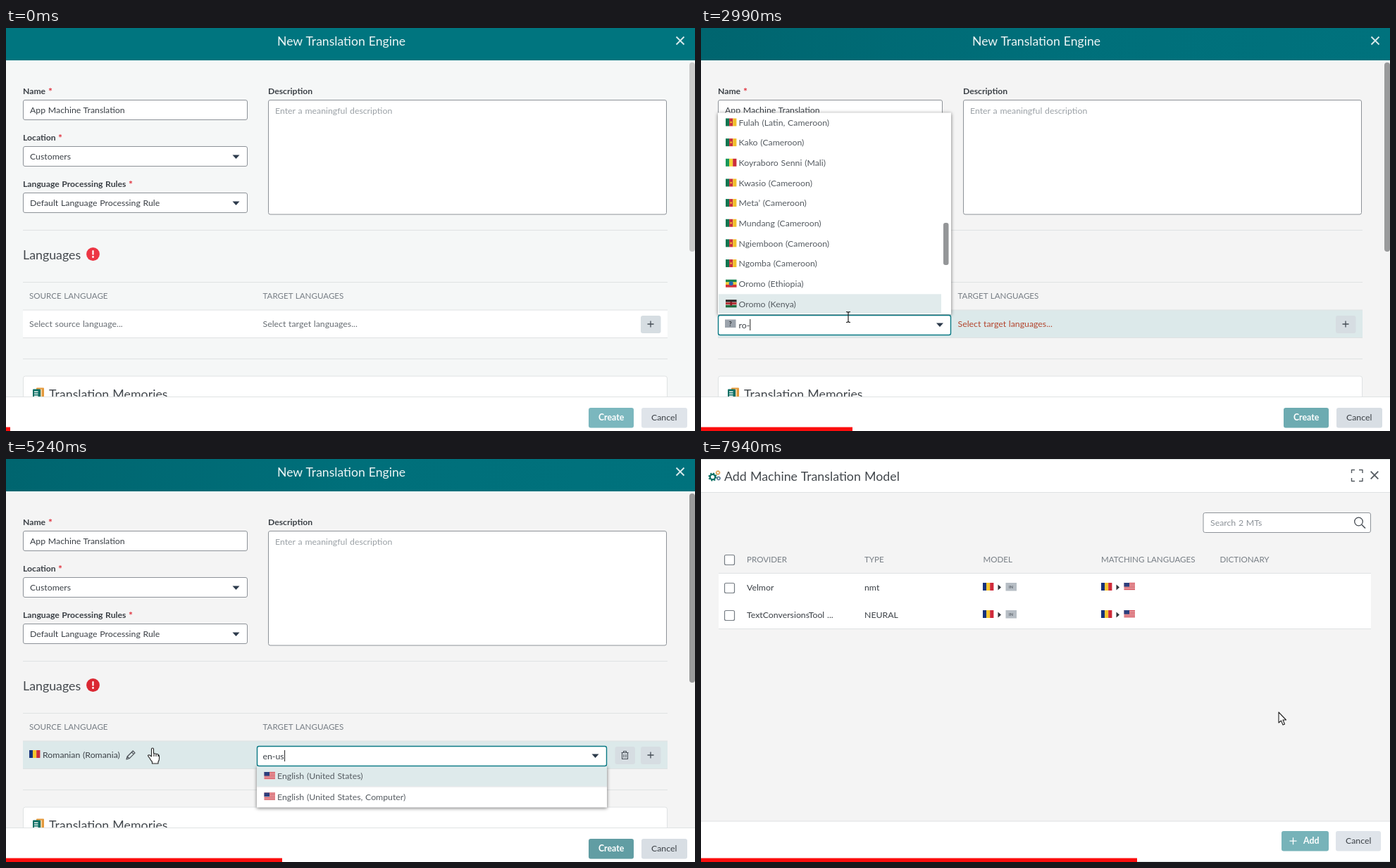
Write an HTML page that moves like this. It is 978x573 px and loops after 8 s.

```html
<!DOCTYPE html>
<html lang="en">
<head>
<meta charset="utf-8">
<title>New Translation Engine</title>
<style>
html, body { margin: 0; width: 100%; height: 100%; overflow: hidden; background: #f4f5f5; }
svg { display: block; width: 100%; height: 100%; font: 12.3px Lato, Carlito, sans-serif; word-spacing: .05em; }
text { white-space: pre; }
.drop { filter: drop-shadow(0 1px 2.5px rgba(0, 0, 0, .55)); }
</style>
</head>
<body>
<svg id="stage" viewBox="0 0 978 573"></svg>
<script>
const LOOP = 8000, SCROLL = 349;
const INK = '#3b4046', TEAL = '#0b7a85', LINE = '#dfe2e3';
const stage = document.getElementById('stage');

// time, progress width, held steps until the next entry
const PACE = [[340, 6, 23], [2010, 138, 14], [2990, 215, 12], [3950, 281, 13],
  [5240, 392, 9], [6360, 486, 14], [7940, 619, 1], [8000, 624, 1]];
const POINTER = [[410, 330, 573], [1170, 209, 411], [5500, 209, 411], [6000, 281, 326],
  [6400, 281, 326], [7060, 820, 360]];
const SOURCE_KEYS = [[2290, 'r'], [2570, 'ro'], [2850, 'ro-'], [3200, 'ro-r'], [3410, 'ro-ro']];
const TARGET_KEYS = [[4300, 'e'], [4490, 'en'], [4690, 'en-'], [4890, 'en-u'], [5090, 'en-us']];
const AT = { hover: 1080, open: 1310, picked: 3820, done: 5370, next: 5750, scroll: 6230, dialog: 7730, rows: 7800 };

const LANGS = [['cm', 'Fulah (Latin, Cameroon)'], ['cm', 'Kako (Cameroon)'], ['ml', 'Koyraboro Senni (Mali)'],
  ['cm', 'Kwasio (Cameroon)'], ['cm', 'Meta’ (Cameroon)'], ['cm', 'Mundang (Cameroon)'],
  ['cm', 'Ngiemboon (Cameroon)'], ['cm', 'Ngomba (Cameroon)'], ['et', 'Oromo (Ethiopia)'], ['ke', 'Oromo (Kenya)']];
const STRIPES = {
  ro: ['v', '#16327c', '#f6c52c', '#cf2b3a'], cm: ['v', '#0d7650', '#c9303a', '#f0c02e'],
  ml: ['v', '#17985a', '#f4d136', '#cc2c3a'], et: ['h', '#17834f', '#f2cd35', '#d2333a'],
  ke: ['h', '#25201f', '#b72f35', '#1c6b3f']
};

const rect = (x, y, w, h, fill, more = '') =>
  `<rect x="${x}" y="${y}" width="${w}" height="${h}" fill="${fill}" ${more}/>`;
const path = (d, stroke, w = 1, fill = 'none') =>
  `<path d="${d}" fill="${fill}" stroke="${stroke}" stroke-width="${w}" stroke-linejoin="round"/>`;
const text = (x, y, s, fill = INK, more = '') => `<text x="${x}" y="${y}" fill="${fill}" ${more}>${s}</text>`;
const bold = (x, y, s) => text(x, y, s, INK, 'font-weight="700" font-size="12.2"');
const head = (x, y, s) => text(x, y, s, '#43484d', 'font-size="17.8"');
const caps = (x, y, s) => text(x, y, s, '#777e85', 'font-size="11.6"');
const rule = (y, x1 = 24, x2 = 939, c = LINE) => rect(x1, y, x2 - x1, 1, c);
const box = (x, y, w, h, stroke = '#8d9298', sw = 1) =>
  rect(x + .5, y + .5, w - 1, h - 1, '#fff', `rx="2.5" stroke="${stroke}" stroke-width="${sw}"`);
const arrow = (x, y) => path(`M${x - 5} ${y - 2.5}h10l-5 5.5z`, 'none', 0, '#2c3a4b');
const plus = (x, y, r = 4.5, c = '#454d56') => path(`M${x - r} ${y}h${2 * r}M${x} ${y - r}v${2 * r}`, c, 1.3);
const cross = (x, y, r, c) => path(`M${x - r} ${y - r}l${2 * r} ${2 * r}M${x + r} ${y - r}l${-2 * r} ${2 * r}`, c, 1.8);
const caret = x => rect(x, 414, 1, 16, '#222');
const move = (x, y, s) => `<g transform="translate(${x} ${y})">${s}</g>`;
const panel = (x, y, w, h) => rect(x, y, w, h, '#fff', 'class="drop"');

function flag(kind, x, y) {
  let s = '';
  if (kind === 'us') {
    for (let i = 0; i < 5; i++) s += rect(0, i * 2.2, 15.5, 1.2, '#cf3440');
    s = rect(0, 0, 15.5, 11, '#f3e4e4') + s + rect(0, 0, 7.5, 5.6, '#2b3f7e');
  } else if (kind === 'none') {
    s = rect(0, 0, 15.5, 11.5, '#9ba3ac') + text(5.4, 9, '?', '#34383d', 'font-size="9" font-weight="700"');
  } else {
    const [dir, ...cols] = STRIPES[kind];
    s = cols.map((c, i) => dir === 'v' ? rect(i * 5.1, 0, 5.2, 11, c) : rect(0, i * 3.6, 15.5, 3.8, c)).join('');
    if (kind === 'cm') s += '<circle cx="7.7" cy="5.5" r="1.3" fill="#f0c02e"/>';
    if (kind === 'et') s += '<circle cx="7.7" cy="5.5" r="3" fill="#2469b3"/>';
    if (kind === 'ke') s += rect(0, 3.2, 15.5, .6, '#eee') + rect(0, 7.1, 15.5, .6, '#eee') +
      '<ellipse cx="7.7" cy="5.5" rx="1.5" ry="3.2" fill="#8d1d25"/>';
  }
  return move(x, y, s);
}

const alert = (x, y, c) => `<circle cx="${x}" cy="${y}" r="9.4" fill="${c}"/>` +
  rect(x - 1.1, y - 5.5, 2.2, 6.8, '#fff', 'rx="1"') + `<circle cx="${x}" cy="${y + 4}" r="1.4" fill="#fff"/>`;

const trash = (x, y) => path(`M${x - 5} ${y - 3.5}h10M${x - 2} ${y - 3.5}v-2h4v2M${x - 4} ${y - 3.5}v9h8v-9M${x - 1.5} ${y - 1}v4.5M${x + 1.5} ${y - 1}v4.5`, '#4b535b', 1.1);
const pencil = (x, y) => path(`M${x - 6} ${y + 6}l1.2-4 8-8 2.8 2.8-8 8zM${x + 1.4} ${y - 4.2}l2.8 2.8M${x - 4.8} ${y + 2}l2.8 2.8`, '#4a4f55', 1.2);
const square = (x, y, icon) => rect(x, y, 28.5, 25, '#d6dde2', 'rx="3"') + icon(x + 14, y + 12);

function gear(x, y, r, c) {
  return `<circle cx="${x}" cy="${y}" r="${r}" fill="none" stroke="${c}" stroke-width="${r * .6}"/>` +
    `<circle cx="${x}" cy="${y}" r="${r * 1.45}" fill="none" stroke="${c}" stroke-width="${r * .4}" stroke-dasharray="${r * .57} ${r * .57}"/>`;
}
const gears = (x, y) => gear(x + 5.5, y + 10.5, 3.7, '#0a6e62') + gear(x + 13, y + 4.5, 2.1, '#e0973c') +
  gear(x + 14, y + 12.5, 1.9, '#35607f');
const memoryIcon = (x, y) => rect(x + 5, y, 11, 13, '#e59a3c', 'rx="1"') + rect(x + 8, y + 2, 5, 12, '#f3cf9d') +
  rect(x, y + 2, 11, 14, '#0b6f64', 'rx="1"') + [5, 8, 11].map(d => rect(x + 2, y + d, 5.5, 1.4, '#fff')).join('');
const termIcon = (x, y) => rect(x, y, 14.5, 17, '#0a6b5a', 'rx="1.5"') + rect(x + 2, y + 2.6, 12.5, 1.3, '#fff') +
  text(x + 2, y + 13.5, 'AZ', '#fff', 'font-size="8.2" font-weight="700"');

function button(x, y, w, label, labelX, opt = {}) {
  const { fill = '#d6dce3', ink = INK, icon = 0, weight = 400 } = opt;
  return rect(x, y, w, 28.5, fill, 'rx="3"') + (icon ? plus(icon, y + 14.2, 5, ink) : '') +
    text(labelX, y + 18.2, label, ink, `font-weight="${weight}"`);
}

function field(y, label, value, select) {
  const mark = { Name: 60, Location: 74 }[label] || 174;
  return bold(24, y - 8.5, label) + text(mark, y - 7, '*', '#e0303c', 'font-weight="700" font-size="14"') +
    box(24, y, 319, 29) + text(34, y + 19, value) + (select ? arrow(326.5, y + 15) : '');
}

function options(x, w, items, thumb) {
  const h = items.length * 28.65, top = 407 - h;
  let s = panel(x, top, w, h);
  items.forEach(([f, name], i) => {
    const y = top + 14 + i * 28.65;
    if (i === items.length - 1) s += rect(x + 1, y - 14, w - 15, 27.5, '#e1ebec');
    s += flag(f, x + 11, y - 6) + text(x + 29.5, y + 4.2, name, '#555b61');
  });
  return s + (thumb ? rect(x + w - 11, thumb, 7.5, 60, '#949698', 'rx="3"') : '');
}

function typed(keys, t) {
  return keys.reduce((s, [at, value]) => t >= at ? value : s, '');
}

function textWidth(s) {
  const probe = document.createElementNS('http://www.w3.org/2000/svg', 'text');
  probe.textContent = s;
  stage.appendChild(probe);
  const w = probe.getComputedTextLength();
  probe.remove();
  return w;
}

function sourceCell(t) {
  if (t < AT.open) return text(33, 425, 'Select source language...', '#686e74');
  const romanian = 'Romanian (Romania)';
  if (t >= AT.picked && t < AT.next) return flag('ro', 33, 414) + text(52, 425, romanian) + pencil(177, 421);
  const frame = box(24, 408, 331, 29, TEAL, 1.4) + arrow(339, 422);
  if (t >= AT.next) return frame + flag('ro', 34, 414.5) + text(53.5, 426.5, romanian);
  const s = typed(SOURCE_KEYS, t);
  let list = '';
  if (s) list = s.length > 3 ? options(24, 331, [['ro', romanian]]) : options(24, 331, LANGS, 277);
  return list + frame + flag('none', 34, 414.5) +
    (s ? text(53.5, 426.5, s) + caret(53.5 + textWidth(s)) : text(53.5, 426.5, 'Select language', '#72787e'));
}

function targetCell(t) {
  if (t < AT.picked) return text(364.5, 425, 'Select target languages...', t < AT.open ? '#686e74' : '#b3452e') +
    square(901, 409, plus);
  if (t >= AT.next) return flag('us', 364.5, 413.5) + square(901, 408, trash);
  let s = box(356, 408, 497, 29, TEAL, 1.4) + arrow(836.5, 422) + square(864.5, 409, trash) + square(901, 409, plus);
  if (t >= AT.done) return s + flag('us', 366, 416) + text(385, 426.5, 'English (United States)');
  const query = typed(TARGET_KEYS, t);
  s += text(364.5, 426.5, query) + caret(365 + (query ? textWidth(query) : 0));
  if (query.length > 3) {
    s = panel(356, 437, 497, 58.5) + rect(356, 437.5, 497, 28, '#deeaeb') + rule(465.5, 356, 853) +
      flag('us', 366.5, 445) + text(385, 455, 'English (United States)', '#555b61') +
      flag('us', 366.5, 474.5) + text(385, 484.5, 'English (United States, Computer)', '#555b61') + s;
  }
  return s;
}

function card(y, h, icon, title, divider) {
  return rect(24.5, y + .5, 914, h, '#fff', `rx="3" stroke="${LINE}"`) + icon + head(61, y + 32, title) +
    (divider ? rule(y + 50, 40, 924, '#eeeff0') : '');
}

function form(t) {
  const late = t >= 800, scrolled = t >= AT.scroll;
  let s = field(102, 'Name', 'App Machine Translation') + field(168, 'Location', 'Customers', true) +
    field(234, 'Language Processing Rules', 'Default Language Processing Rule', true) +
    bold(372, 93.5, 'Description') + box(372, 102, 566, 163.5) +
    text(382, 122, 'Enter a meaningful description', '#9ba1a6') +
    rule(287) + head(24, 328.5, 'Languages') + (t < AT.next ? alert(123.5, 321.5, late ? '#da2832' : '#ec3644') : '') +
    rule(361) + caps(33, 385, 'SOURCE LANGUAGE') + caps(364.5, 385, 'TARGET LANGUAGES') +
    rect(24, 401, 915, 40, t >= AT.hover ? '#dce9ea' : '#fff') + rule(400.5) + rule(440) + rule(470);
  s += card(494.5, 107, memoryIcon(38, 511.5), 'Translation Memories') +
    (t >= AT.next ? alert(248.5, 518.5, '#c1800f') : '') +
    button(744, 558, 179, 'Add Translation Memory', 774, { icon: 760 }) +
    card(616, 108.5, gears(39, 632), 'Machine Translation', true) +
    button(705, 681, 218, 'Add Machine Translation Model', 735, { icon: 720.5, fill: t >= 7000 ? '#c7ced7' : '#d6dce3' }) +
    card(739.5, 108, termIcon(39, 756), 'Termbases', true) +
    button(796, 804.5, 128, 'Add Termbases', 826, { icon: 811.5 });
  s += targetCell(t) + sourceCell(t);

  const fill = late ? 'url(#bar)' : '#00757f';
  return rect(0, 0, 978, 573, scrolled ? '#f0f0f0' : late ? '#f4f4f4' : '#f5f7f7') +
    move(0, scrolled ? -SCROLL : 0, s) +
    '<linearGradient id="bar"><stop stop-color="#00656f"/><stop offset=".5" stop-color="#006f7a"/><stop offset="1" stop-color="#00727d"/></linearGradient>' +
    rect(0, 0, 978, 46, fill) +
    text(385, 25, 'New Translation Engine', '#eef6f6', 'font-size="17.6"') + cross(957, 18, 5.5, '#d9eaec') +
    rect(970, scrolled ? 249 : 49, 8, 269, scrolled ? '#898a8b' : late ? '#999a9b' : '#c9caca', 'rx="4"') +
    rect(0, 524, 978, 49, '#fff') + rule(524, 0, 978) +
    button(827, 540, 64, 'Create', 841, { fill: t >= 5000 ? '#619da3' : late ? '#6dabb1' : '#7bb7be', ink: '#fff', weight: 700 }) +
    button(902, 540, 65, 'Cancel', 916, { fill: late ? '#d8dee4' : '#dfe4ea' });
}

const check = y => rect(33.5, y - 6.5, 14, 14, '#fff', 'rx="2" stroke="#767d84" stroke-width="1.2"');

function modelRow(y, provider, type) {
  const pair = x => flag('ro', x, y - 7) + path(`M${x + 21.5} ${y - 4.5}l4.5 4-4.5 4z`, 'none', 0, '#30353a');
  return rect(25, y - 20, 926, 39, '#fff') + rule(y + 19, 25, 951) + check(y) +
    text(65, y + 4, provider) + text(232, y + 4, type) +
    pair(400) + rect(432.5, y - 7, 15.5, 11.5, '#b6bdc4') + text(437, y + 1, 'IN', '#555d65', 'font-size="5.5" font-weight="700"') +
    pair(568) + flag('us', 600.5, y - 7);
}

function dialog(t) {
  let s = rect(0, 0, 978, 573, '#f4f4f4') + rect(0, 0, 978, 47, '#fff') + rule(0, 0, 978) + rule(47, 0, 978) +
    gears(11, 15) + head(33, 30.5, 'Add Machine Translation Model') +
    path('M923.5 20v-4.5h4.5M934 15.5h5v4.5M939 27v4.5h-5M928 31.5h-4.5v-4.5', '#555b61', 1.4) + cross(956, 23, 5.3, '#555b61') +
    box(712.5, 76, 238.5, 29) + text(723, 95, 'Search 2 MTs', '#8c9298') +
    '<circle cx="933.5" cy="89" r="5.8" fill="none" stroke="#454b52" stroke-width="1.3"/>' + path('M938 93.5l5 5', '#454b52', 1.5) +
    check(143) + caps(65, 147, 'PROVIDER') + caps(232, 147, 'TYPE') + caps(400.5, 147, 'MODEL') +
    caps(568, 147, 'MATCHING LANGUAGES') + caps(736.5, 147, 'DICTIONARY') + rule(162, 25, 951);
  if (t >= AT.rows) s += modelRow(183, 'Velmor', 'nmt') + modelRow(222, 'TextConversionsTool ...', 'NEURAL');
  return s + rect(0, 515, 978, 58, '#fff') + rule(514.5, 0, 978) +
    button(824, 529, 67, 'Add', 855, { fill: '#77b3b9', ink: '#fff', icon: 840.5, weight: 700 }) +
    button(901, 529, 64, 'Cancel', 915, { fill: '#dfe4ea' }) + rule(572, 0, 978);
}

function track(keys, t) {
  const i = keys.findIndex(k => k[0] > t);
  if (i < 0) return keys[keys.length - 1].slice(1);
  if (!i) return keys[0].slice(1);
  const a = keys[i - 1], b = keys[i], p = (t - a[0]) / (b[0] - a[0]), e = p * p * (3 - 2 * p);
  return [1, 2].map(k => a[k] + (b[k] - a[k]) * e);
}

function pointer(t) {
  if (t < 410) return '';
  const [x, y] = track(POINTER, t);
  const hand = path('M-2.5 12V1.5q0-1.5 1.5-1.5t1.5 1.5v6l5 1q3 .7 3 3.5v3q0 3-1.5 4.5v2.5h-8.5v-2.5q-2-2-3.5-5-2.5-3-2.5-4 1.5-1.5 3 0zM1 8v4M4 9v3M7 10v2', '#222', 1.1, '#fff');
  const plain = path('M0 0v15l3.5-3 2.5 6 2.5-1-2.5-6h4.5z', '#222', 1.1, '#fff');
  const beam = path('M-3-7.5q3 0 3 1.5v12q0 1.5-3 1.5M3-7.5q-3 0-3 1.5M3 7.5q-3 0-3-1.5', '#222', 1.2);
  let shape = plain;
  if (t >= AT.open && t < AT.picked) shape = beam;
  else if (t >= AT.hover && t < 5560 || t >= 7000 && t < AT.dialog) shape = hand;
  return move(x.toFixed(1), y.toFixed(1), shape);
}

function pace(t) {
  if (t < PACE[0][0]) return [t, PACE[0][1]];
  const i = PACE.findIndex(k => k[0] > t) - 1;
  const [t0, w0, n] = PACE[i], [t1, w1] = PACE[i + 1];
  const p = Math.floor((t - t0) / (t1 - t0) * n) / n;
  return [t0 + (t1 - t0) * p, w0 + (w1 - w0) * p];
}

let last = '';
function draw() {
  const now = performance.now() % LOOP;
  const [t, w] = pace(now);
  const s = (now >= AT.dialog ? dialog(now) : form(t)) + pointer(now >= AT.dialog ? now : t) +
    rect(0, 567.5, w.toFixed(1), 5.5, '#fb0d0d');
  if (s !== last) stage.innerHTML = last = s;
  requestAnimationFrame(draw);
}
draw();
</script>
</body>
</html>
```
